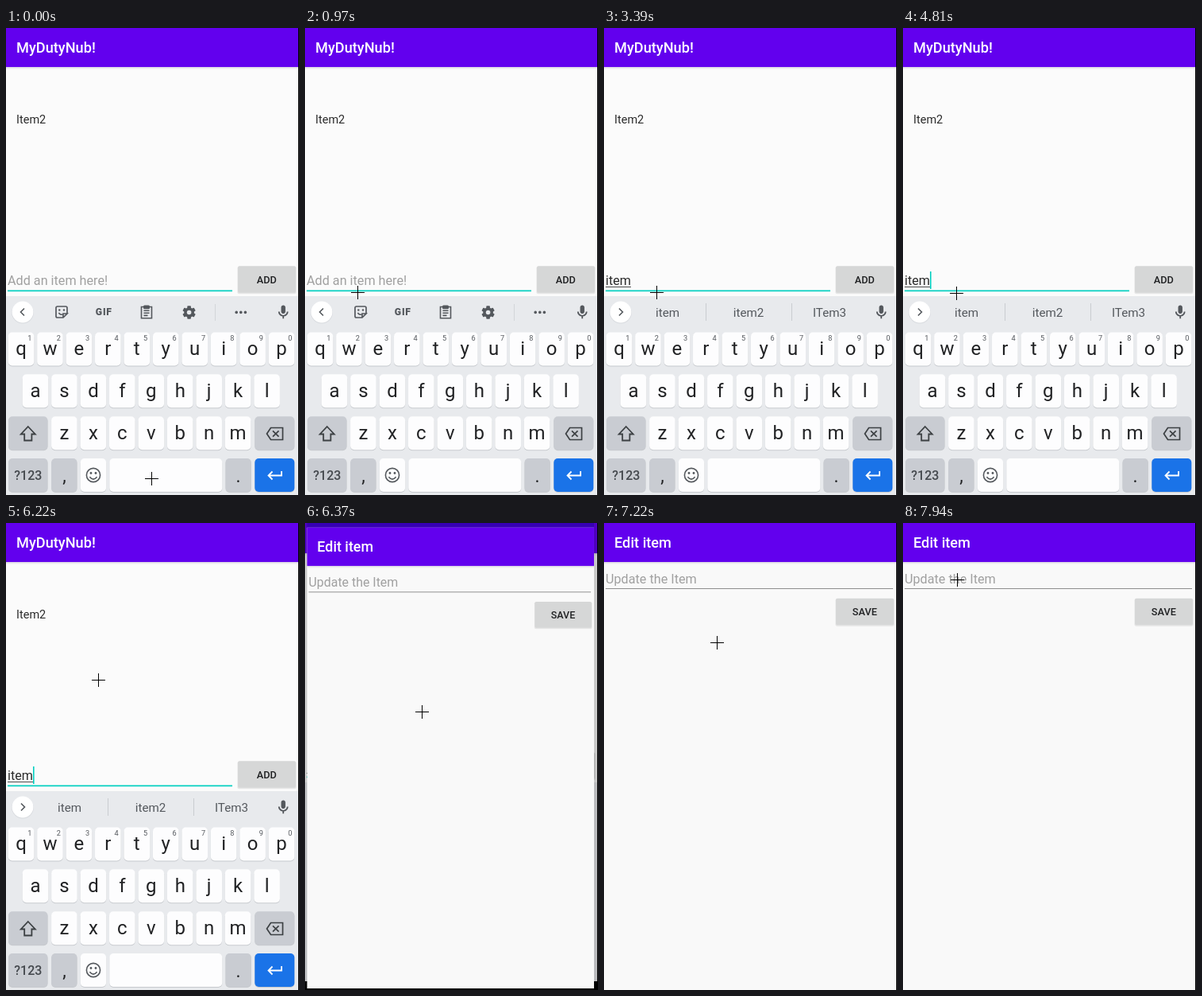
Write an HTML page with a canvas that moves like this. It is 369 by 587 pixels and loops after 8 s.

```html
<!DOCTYPE html>
<html lang="en">
<head>
<meta charset="utf-8">
<title>Todo list</title>
<style>
  html, body { margin: 0; width: 100%; height: 100%; overflow: hidden; background: #fbfbfb; }
  canvas { display: block; width: 369px; height: 587px; }
</style>
</head>
<body>
<canvas id="stage"></canvas>
<script>
const W = 369, H = 587, LOOP = 8000;
const FONT = 'Roboto, "Noto Sans", sans-serif';
const INK = '#212224', ICON = '#54585d', PURPLE = '#6200ee', TEAL = '#03cfc0';

const canvas = document.getElementById('stage');
const ctx = canvas.getContext('2d');
const dpr = window.devicePixelRatio || 1;
canvas.width = W * dpr;
canvas.height = H * dpr;

// Each row: start time, then the values that hold from then on.
const POINTER = [
  [0, 183, 566], [120, 182, 548], [270, 180, 490], [410, 158, 424], [550, 92, 352],
  [690, 66, 332], [4410, 67, 333], [5510, 72, 296], [5660, 80, 238], [5800, 107, 188],
  [5940, 115, 180], [6220, 116, 197], [6370, 147, 237], [6520, 151, 242],
  [6920, 150, 226], [7070, 147, 190], [7210, 142, 150], [7360, 123, 114],
  [7500, 98, 86], [7650, 76, 65], [7790, 67, 60], [7940, 68, 71]
];
const TYPED = [[0, ''], [2050, 'i'], [2300, 'it'], [2600, 'ite'], [2840, 'item']];
const HINTS = [
  [0], [2180, 'i', 'I', "I'm"], [2450, 'it', 'It', "it's"],
  [2600, 'ite', 'item', 'items'], [2990, 'item', 'item2', 'ITem3']
];
const CARET = [
  [0, 0], [410, 1], [970, 0], [1370, 1], [1900, 0], [2050, 1], [3390, 0],
  [3830, 1], [4260, 0], [4810, 1], [5370, 0], [5800, 1]
];

function at(rows, t) {
  let i = rows.length - 1;
  while (i > 0 && rows[i][0] > t) i--;
  return rows[i].slice(1);
}

function rect(x, y, w, h, color) {
  ctx.fillStyle = color;
  ctx.fillRect(x, y, w, h);
}

function box(x, y, w, h, r, color) {
  ctx.fillStyle = color;
  ctx.beginPath();
  ctx.roundRect(x, y, w, h, r);
  ctx.fill();
}

function text(s, x, y, size, color, align = 'left', weight = 400) {
  ctx.font = `${weight} ${size}px ${FONT}`;
  ctx.textAlign = align;
  ctx.fillStyle = color;
  ctx.fillText(s, x, y);
}

function dot(x, y, r, color) {
  ctx.fillStyle = color;
  ctx.beginPath();
  ctx.arc(x, y, r, 0, 7);
  ctx.fill();
}

function line(d, x, y, color = ICON, width = 1.7) {
  ctx.save();
  ctx.translate(x, y);
  ctx.strokeStyle = color;
  ctx.lineWidth = width;
  ctx.stroke(new Path2D(d));
  ctx.restore();
}

function header(title) {
  rect(0, 49, 368, 1, '#dcd6e6');
  rect(0, 50, 368, 1, '#ebe9ee');
  rect(0, 51, 368, 1, '#f4f4f5');
  rect(0, 0, 368, 49, PURPLE);
  text(title, 13, 31, 18.2, '#fff', 'left', 500);
}

function button(label, y) {
  box(291.5, y + 0.5, 74, 34.5, 2, '#e6e6e6');
  box(292, y, 73, 33.5, 2, '#d6d7d7');
  text(label, 328.3, y + 21.4, 12.7, INK, 'center', 500);
}

function key(x, y, w, color = '#fdfdfe') {
  box(x, y + 1, w, 42, 5, '#c6c9cd');
  box(x, y, w, 42, 5, color);
}

function letters(row, x, y) {
  [...row].forEach((c, i) => {
    const cx = x + i * 36.45;
    key(cx - 16.3, y, 32.6);
    text(c, cx, y + 28.6, 24, INK, 'center');
  });
}

function mic() {
  ctx.save();
  ctx.translate(338.4, 346.8);
  ctx.scale(0.9, 0.88);
  ctx.fillStyle = ICON;
  ctx.fill(new Path2D('M12 14c1.66 0 3-1.34 3-3V5c0-1.66-1.34-3-3-3S9 3.34 9 5v6c0 1.66 1.34 3 3 3z' +
    'M17 11c0 2.76-2.24 5-5 5s-5-2.24-5-5H5c0 3.53 2.61 6.43 6 6.92V21h2v-3.08c3.39-.49 6-3.39 6-6.92z'));
  ctx.restore();
}

function gear(x, y) {
  for (let i = 0; i < 6; i++) {
    ctx.save();
    ctx.translate(x, y);
    ctx.rotate(i * Math.PI / 3);
    box(-2.3, -8.2, 4.6, 4, 0.8, ICON);
    ctx.restore();
  }
  dot(x, y, 6.3, ICON);
  dot(x, y, 2.8, '#e8eaed');
}

function tools() {
  line('M7 2V-5.2A1.8 1.8 0 0 0 5.2 -7H-5.2A1.8 1.8 0 0 0 -7 -5.2V5.2A1.8 1.8 0 0 0 -5.2 7H2L7 2H2V7' +
    'M-3.6 1Q-1.5 4 1 3', 70, 357);
  dot(67.3, 354.5, 1.2, ICON);
  dot(73, 354.5, 1.2, ICON);
  ctx.letterSpacing = '0.8px';
  text('GIF', 123.3, 361.3, 12.2, ICON, 'center', 900);
  ctx.letterSpacing = '0px';
  line('M-6.5 -6.5H6.5V7.7H-6.5ZM-3.5 -1.8H3.5M-3.5 1.3H3.5M-3.5 4.4H1.5', 177, 357, ICON, 1.6);
  box(173, 348.6, 8, 4.6, 1.5, ICON);
  gear(230.6, 357.5);
  rect(263, 347, 1, 21, '#d3d6d9');
  for (const x of [290.2, 295.8, 301.4]) dot(x, 357.4, 1.8, ICON);
}

function strip(hints) {
  dot(21, 357.8, 13.8, '#d7dade');
  dot(21, 357, 13.4, '#fff');
  line(hints.length ? 'M-2 -4.5L2.5 0L-2 4.5' : 'M2 -4.5L-2.5 0L2 4.5', 21, 357, ICON, 1.6);
  if (hints.length) {
    hints.forEach((s, i) => text(s, 80 + i * 102, 363, 15.2, ICON, 'center'));
    rect(128, 346, 1, 22, '#c9ccd0');
    rect(236, 346, 1, 22, '#c9ccd0');
  } else tools();
  mic();
}

function keyboard(hints) {
  rect(0, 337, 368, 250, '#e8eaed');
  strip(hints);
  letters('qwertyuiop', 19, 382.5);
  for (let i = 0; i < 10; i++) {
    text((i + 1) % 10, 29.8 + i * 36.45, 393, 9.2, ICON, 'center');
  }
  letters('asdfghjkl', 37, 435.3);
  letters('zxcvbnm', 73.4, 488.2);
  const grey = '#c9ccd2';
  key(3, 488.2, 49.5, grey);
  key(313.3, 488.2, 50, grey);
  line('M0 -9L9 0.5H4.6V8.5H-4.6V0.5H-9Z', 27.8, 510, '#3c4043', 1.8);
  line('M-10 0L-5 -7.5H10V7.5H-5ZM-2.5 -3.7L5 3.7M5 -3.7L-2.5 3.7', 338.5, 510, '#3c4043', 1.7);

  key(3, 541, 49.5, grey);
  text('?123', 27.8, 568, 16, '#45494e', 'center', 500);
  key(57.2, 541, 32.3, grey);
  text(',', 73.6, 571, 23, INK, 'center');
  key(93.8, 541, 32.3);
  line('M8.6 0A8.6 8.6 0 1 1 -8.6 0A8.6 8.6 0 1 1 8.6 0M-4.6 2.2Q0 8 4.6 2.2', 110, 562, ICON, 1.6);
  dot(107, 559.5, 1.4, ICON);
  dot(113, 559.5, 1.4, ICON);
  key(130.3, 541, 142);
  key(276.5, 541, 32.3, grey);
  text('.', 292.5, 571, 23, INK, 'center');
  key(313.3, 541, 50, '#1a73e8');
  line('M8.5 -5V0.5H-7.5M-3 -4.5L-8 0.5L-3 5.5', 338.5, 562, '#fff', 1.8);
}

function listScreen(t) {
  const [typed] = at(TYPED, t), [caret] = at(CARET, t);
  rect(0, 0, 368, H, '#fbfbfb');
  header('MyDutyNub!');
  text('Item2', 13, 119.5, 14.5, '#2b2b2b');
  rect(2, 329.5, 283, 1.7, TEAL);
  if (typed) {
    text(typed, 2, 323, 16.2, '#2b2b2b');
    rect(2, 325, ctx.measureText(typed).width, 1, '#4a4a4a');
  } else {
    text('Add an item here!', 2, 323, 16.2, '#a0a0a0');
  }
  ctx.font = `400 16.2px ${FONT}`;
  if (caret) rect(Math.round(1.5 + ctx.measureText(typed).width), 306, 1.6, 22, TEAL);
  button('ADD', 299.3);
  keyboard(at(HINTS, t));
}

function editScreen() {
  rect(0, -40, 368, 40, '#3700b3');
  rect(0, 0, 368, 590, '#f9f9f9');
  rect(0, 590, 368, 40, '#000');
  header('Edit item');
  text('Update the Item', 2, 76, 16.2, '#a0a0a0');
  rect(2, 82, 362, 1, '#8f8f8f');
  button('SAVE', 94.8);
}

function openEditor(t) {
  const [scale, x, y] = t < 6520 ? [0.982, 2.6, 5.8] : t < 6640 ? [0.997, 0.5, 0.9] : [1, 0, 0];
  if (scale < 1) {
    rect(0, 0, W, H, '#000');
    ctx.save();
    ctx.translate(0, -11);
    listScreen(t);
    ctx.restore();
    rect(0, 0, W, H, 'rgba(0,0,0,.2)');
  }
  ctx.save();
  ctx.translate(x, y);
  ctx.scale(scale, scale);
  editScreen();
  ctx.restore();
}

function draw() {
  const t = performance.now() % LOOP;
  ctx.setTransform(dpr, 0, 0, dpr, 0, 0);
  if (t < 6370) listScreen(t);
  else openEditor(t);
  rect(368, 0, 1, H, '#000');
  const [x, y] = at(POINTER, t);
  rect(x - 8, y, 17, 1, '#000');
  rect(x, y - 8, 1, 17, '#000');
  requestAnimationFrame(draw);
}
requestAnimationFrame(draw);
</script>
</body>
</html>
```
